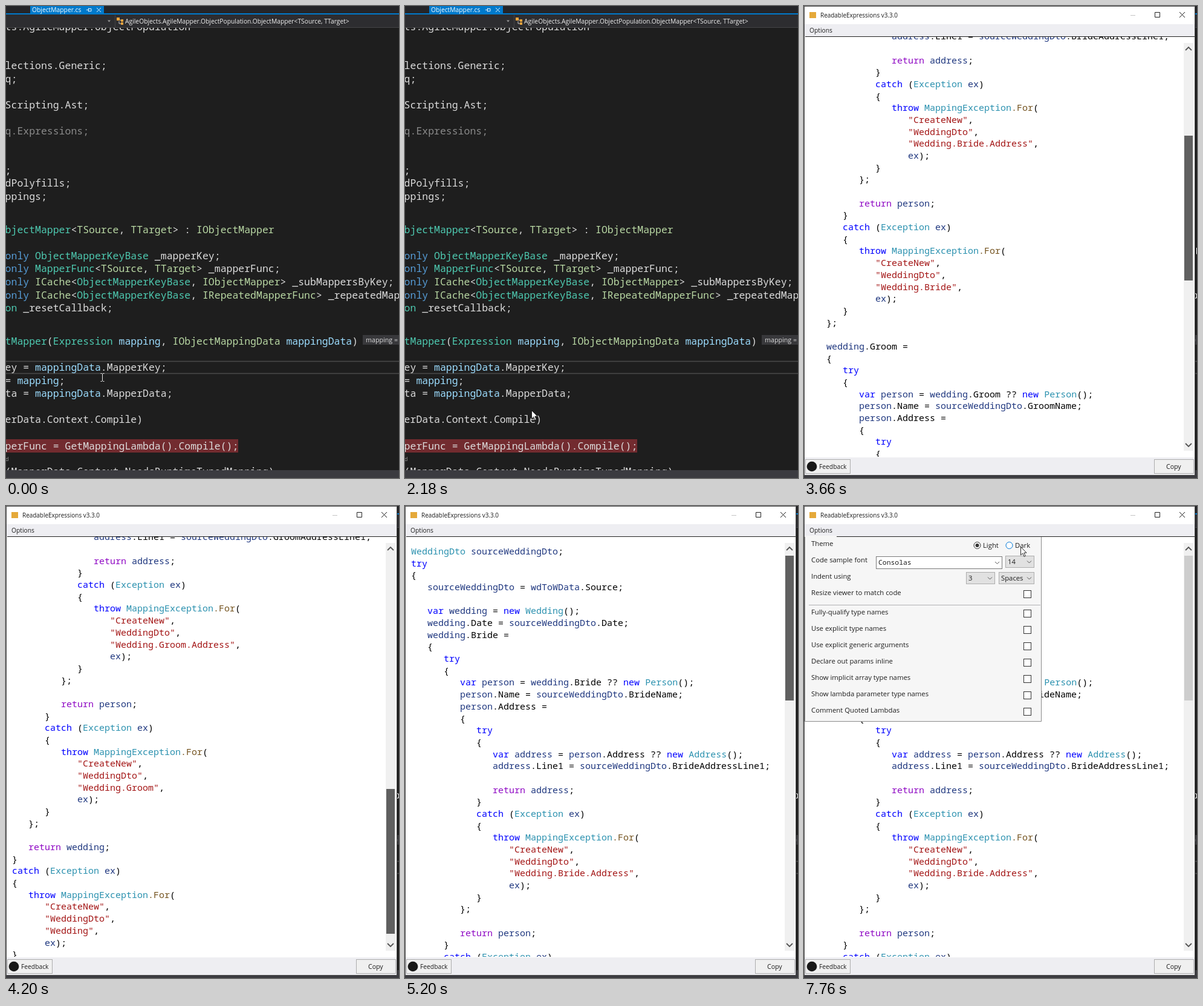
An HTML page that plays this animation: 650x779 px, repeating every 8 s.

```html
<!DOCTYPE html>
<html lang="en">
<head>
<meta charset="utf-8">
<title>Expression viewer</title>
<style>
  html, body { margin: 0; width: 100%; height: 100%; overflow: hidden; background: #1e1e1e; }
  svg { display: block; }
  text { font: 10.3px "Open Sans", "Noto Sans", sans-serif; white-space: pre; }
  .dark text { font: 16.49px "Noto Sans Mono", monospace; fill: #dcdcdc; }
  .light text { font: 15px "Noto Sans Mono", monospace; fill: #000; }
  .panel text { font-size: 11.3px; fill: #1e1e1e; }
  .panel .mono { font: 11.4px "Noto Sans Mono", monospace; }
  .dark .kw { fill: #569cd6; }
  .dark .type { fill: #4ec9b0; }
  .dark .iface { fill: #b8d7a3; }
  .dark .param { fill: #9cdcfe; }
  .dark .dim { fill: #8a8a8a; }
  .light .kw { fill: #0000ff; }
  .light .ret { fill: #8f08c4; }
  .light .type { fill: #2b91af; }
  .light .var { fill: #1f377f; }
  .light .fn { fill: #74531f; }
  .light .str { fill: #a31515; }
</style>
</head>
<body>
<svg id="stage" width="650" height="779" viewBox="0 0 650 779"></svg>
<script>
const stage = document.getElementById('stage');
const $ = id => document.getElementById(id);

// Markup helpers
const esc = s => s.replace(/&/g, '&amp;').replace(/</g, '&lt;');
const rect = (x, y, w, h, fill, more = '') =>
  `<rect x="${x}" y="${y}" width="${w}" height="${h}" fill="${fill}" ${more}/>`;
const box = (x, y, w, h, fill, stroke) => rect(x + .5, y + .5, w - 1, h - 1, fill, `stroke="${stroke}"`);
const path = (d, stroke = '#555', width = 1) =>
  `<path d="${d}" fill="none" stroke="${stroke}" stroke-width="${width}"/>`;
const label = (x, y, s, fill = '#1e1e1e', more = '') =>
  `<text x="${x}" y="${y}" fill="${fill}" ${more}>${esc(s)}</text>`;
const span = (cls, s) => cls ? `<tspan class="${cls}">${esc(s)}</tspan>` : esc(s);

// Editor behind the viewer
const editorLines = [
  [34, 'ts.AgileMapper.ObjectPopulation'],
  [98, 'lections.Generic;'],
  [120, 'q;'],
  [163, 'Scripting.Ast;'],
  [206, 'q.Expressions;'],
  [271, ';'],
  [292, 'dPolyfills;'],
  [314, 'ppings;'],
  [369, 'bjectMapper<TSource, TTarget> : IObjectMapper'],
  [412, 'only ObjectMapperKeyBase _mapperKey;'],
  [433, 'only MapperFunc<TSource, TTarget> _mapperFunc;'],
  [455, 'only ICache<ObjectMapperKeyBase, IObjectMapper> _subMappersByKey;'],
  [477, 'only ICache<ObjectMapperKeyBase, IRepeatedMapperFunc> _repeatedMappers;'],
  [498, 'on _resetCallback;'],
  [553, 'tMapper(Expression mapping, IObjectMappingData mappingData)'],
  [596, 'ey = mappingData.MapperKey;'],
  [618, '= mapping;'],
  [639, 'ta = mappingData.MapperData;'],
  [682, 'erData.Context.Compile)'],
  [726, 'perFunc = GetMappingLambda().Compile();'],
  [768, '(MapperData.Context.NeedsRuntimeTypedMapping)']
];

function editorToken(w) {
  if (w === 'only') return 'kw';
  if (/^(I[A-Z]\w+|TSource|TTarget)$/.test(w)) return 'iface';
  if (/^(bjectMapper|tMapper|ObjectMapperKeyBase|MapperFunc|Expression|on)$/.test(w)) return 'type';
  if (/^mapping(Data)?$/.test(w)) return 'param';
}

const editorText = ([y, s]) => {
  const body = s === 'q.Expressions;' ? span('dim', s)
    : s.match(/\w+|\W+/g).map(w => span(editorToken(w), w)).join('');
  return `<text x="-1.4" y="${y + 5.5}">${body}</text>`;
};

const editor = `
  ${rect(0, 0, 650, 779, '#1e1e1e')}
  <svg y="36" width="650" height="730" viewBox="0 36 650 730">
    ${rect(0, 715, 384, 22, '#722b2f')}
    ${path('M0 586.5H650M0 606.5H650', '#4a4a4a', 1.5)}
    <g class="dark">${editorLines.map(editorText).join('')}</g>
    ${label(-1, 751, 'd', '#999', 'style="font-size:9px"')}
    ${rect(590, 543, 60, 16, '#38383b')}
    ${label(595, 555, 'mapping =', '#dcdcdc', 'style="font-size:10.7px"')}
  </svg>
  ${rect(0, 766, 650, 13, '#3b3b40')}
  ${rect(0, 0, 650, 36, '#2d2d30')}
  ${rect(0, 0, 650, 13, '#252528')}
  ${rect(40, 0, 122, 14, '#007acc')}
  ${rect(0, 12, 650, 2, '#007acc')}
  ${label(43, 10, 'ObjectMapper.cs', '#fff')}
  ${path('M133 6.5h3M136.5 3.5v6M137 4.5h4v4h-4M150 3l7 7M157 3l-7 7', '#e6f2fa')}
  ${path('M0 35.5H650M180.5 15V35', '#434346')}
  <path d="M168 23.500h5l-2.500 3z" fill="#999"/>
  ${path('M187 22l3 2M187 25v4h4', '#c8c8c8')}
  ${rect(183, 19, 5, 5, '#e8a33d')}${rect(190, 22, 4, 4, '#e8a33d')}${rect(190, 27, 4, 4, '#e8a33d')}
  ${label(197, 29, 'AgileObjects.AgileMapper.ObjectPopulation.ObjectMapper<TSource, TTarget>', '#f1f1f1')}`;

const tip = `<g id="tip">
  ${box(62, 627, 285, 21, '#424245', '#5a5a5e')}
  <g id="tipHover">${rect(64, 629, 276, 17, '#54545a')}</g>
  <path d="M69 633.500l5 4-5 4z" fill="#c8c8c8"/>
  ${box(80, 633, 9, 9, '#75bfff', '#424245')}
  ${label(94, 641.5, 'mapping', '#f1f1f1')}
  <circle cx="166" cy="636" r="3.500" fill="none" stroke="#e0e0e0"/>
  ${path('M168.500 638.500l4 4', '#e0e0e0', 1.5)}
  <path d="M175 636h5l-2.500 3z" fill="#c8c8c8"/>
  ${label(186, 641.5, '{wdToWData => { var wedding }}', '#f1f1f1')}
</g>`;

// Code shown in the viewer
const indent = lines => lines.map(l => l && '   ' + l);
const guarded = (body, name) => [
  'try', '{', ...indent(body), '}',
  'catch (Exception ex)', '{',
  ...indent(['throw MappingException.For(', ...indent(['"CreateNew",', '"WeddingDto",', `"${name}",`, 'ex);'])]),
  '}'
];
const partner = p => [
  `wedding.${p} =`, '{',
  ...indent(guarded([
    `var person = wedding.${p} ?? new Person();`,
    `person.Name = sourceWeddingDto.${p}Name;`,
    'person.Address =', '{',
    ...indent(guarded([
      'var address = person.Address ?? new Address();',
      `address.Line1 = sourceWeddingDto.${p}AddressLine1;`,
      '', 'return address;'
    ], `Wedding.${p}.Address`)),
    '};', '', 'return person;'
  ], `Wedding.${p}`)),
  '};', ''
];
const viewerLines = ['WeddingDto sourceWeddingDto;', ...guarded([
  'sourceWeddingDto = wdToWData.Source;', '',
  'var wedding = new Wedding();',
  'wedding.Date = sourceWeddingDto.Date;',
  ...partner('Bride'), ...partner('Groom'),
  'return wedding;'
], 'Wedding')];

function viewerToken(w) {
  if (w[0] === '"') return 'str';
  if (w === '.For') return 'fn';
  if (w === 'return') return 'ret';
  if (/^(var|new|try|catch|throw)$/.test(w)) return 'kw';
  if (/^[A-Z]/.test(w)) return 'type';
  if (/^[a-z]/.test(w)) return 'var';
}

const viewerText = (s, i) => {
  const code = s.trimStart();
  if (!code) return '';
  const body = code.match(/"[^"]*"|\.?\w+|[^\w".]+/g).map(w => span(viewerToken(w), w)).join('');
  return `<text x="${10 + 9 * (s.length - code.length)}" y="${(80 + i * 19.68).toFixed(2)}">${body}</text>`;
};

const viewer = `
  ${box(0, 0, 647, 775, '#fff', '#4a4a4a')}
  ${rect(9, 10, 11, 10, '#e5a93a')}
  <g id="caption">${label(27, 19, 'ReadableExpressions v3.3.0', 'currentColor', 'style="font-size:9.95px"')}
    ${path('M621 10l9 9M630 10l-9 9', 'currentColor')}</g>
  ${path('M540 15.500h8', '#c4c4c4')}
  ${path('M580.500 10.500h8v8h-8z', '#222')}
  ${rect(1, 30, 645, 21, '#eeeef2')}
  ${label(9, 44, 'Options')}
  ${path('M2 50.500H646', '#222')}
  <svg y="51" width="646" height="693" viewBox="0 51 646 693">
    <g id="code" class="light">${viewerLines.map(viewerText).join('')}</g>
    ${rect(628, 61, 16, 673, '#f0f0f0')}
    <rect id="thumb" x="629" width="14" height="239"/>
    ${path('M631 73l5-5 5 5M631 722l5 5 5-5', '#555', 1.8)}
  </svg>
  ${rect(1, 745, 645, 29, '#eeeef2')}
  ${box(2, 748, 75, 24, '#f0f0f0', '#adadad')}
  <circle cx="13" cy="760" r="8.300" fill="#181818"/>
  ${label(25, 763.5, 'Feedback')}
  ${box(579, 748, 66, 24, '#f0f0f0', '#adadad')}
  ${label(599, 763.5, 'Copy', '#1e1e1e', 'style="font-size:10.6px"')}`;

// Options panel
const combo = (x, y, w, h, s, fill = '#e1e1e1', stroke = '#adadad', cls = '') =>
  box(x, y, w, h, fill, stroke) +
  label(x + 4, y + h / 2 + 3.8, s, '#1e1e1e', `class="${cls}"`) +
  path(`M${x + w - 12} ${y + h / 2 - 1.5}l3.500 3.500 3.500-3.500`);
const settings = ['Fully-qualify type names', 'Use explicit type names', 'Use explicit generic arguments',
  'Declare out params inline', 'Show implicit array type names', 'Show lambda parameter type names',
  'Comment Quoted Lambdas'];
const check = y => box(363, y, 13, 13, '#fff', '#333');

const panel = `<g id="panel" class="panel">
  ${rect(1, 51, 392, 305, '#f6f6f6')}
  ${path('M1.500 51V355.500H392.500V51', '#8c8c8c')}
  ${rect(2, 49, 52, 3, '#f6f6f6')}
  ${['Theme', 'Code sample font', 'Indent using', 'Resize viewer to match code']
    .map((s, i) => label(12, 66 + i * 27, s)).join('')}
  <circle cx="286.500" cy="65" r="5.500" fill="#fff" stroke="#333"/>
  <circle cx="286.500" cy="65" r="3" fill="#333"/>
  ${label(296, 69, 'Light')}
  <circle id="darkRing" cx="339.500" cy="65" r="5.500" fill="#fff"/>
  ${label(349, 69, 'Dark')}
  ${combo(119, 83, 209, 21, 'Consolas', '#fff', '#7a7a7a', 'mono')}
  ${combo(333, 82, 48, 20, '14')}
  ${combo(268, 109, 48, 20, '3')}
  ${combo(322, 109, 59, 20, 'Spaces')}
  ${check(139)}
  ${path('M8 163.500H391', '#b0b0b4')}
  ${settings.map((s, i) => label(12, 179 + i * 27, s) + check(171 + i * 27)).join('')}
</g>`;

const pointers = `
  <g id="beam">${path('M-3-6.500h2l1 1 1-1h2M0-6V6M-3 6.500h2l1-1 1 1h2', '#e8e8e8')}</g>
  <path id="arrow" d="M.500.500V14l3.200-3 2.300 5.500 2.200-1-2.300-5.300H10z" fill="#fff" stroke="#111" stroke-width=".9"/>`;

stage.innerHTML = editor + tip + `<g id="viewer">${viewer}${panel}</g>` + pointers;

const LOOP = 8000, TICK = 77.6;
const pointerKeys = [
  [0, 159, 613], [3, 58, 608], [8, 58, 608], [9, 58, 617], [12, 58, 617], [18, 161, 634],
  [19, 161, 634], [20, 169, 638], [21, 167, 640], [26, 167, 640], [28, 209, 667], [31, 213, 665],
  [37, 634, 252], [38, 636, 251], [42, 636, 251], [43, 638, 268], [47, 648, 397], [54, 649, 648],
  [57, 648, 699], [58, 648, 699], [59, 670, 705], [71, 670, 240], [72, 577, 200], [82, 26, 40],
  [85, 26, 40], [91, 256, 78], [92, 256, 78], [93, 264, 79], [100, 358, 67]
];
const thumbKeys = [[42, 0], [43, 7], [47, 132], [54, 385], [57, 391], [61, 391], [67, 0]];

function at(keys, n) {
  const i = keys.findIndex(k => k[0] > n);
  if (i < 0) return keys[keys.length - 1].slice(1);
  if (i === 0) return keys[0].slice(1);
  const a = keys[i - 1], b = keys[i], u = (n - a[0]) / (b[0] - a[0]);
  return a.slice(1).map((v, j) => v + (b[j + 1] - v) * u);
}
const show = (id, on) => $(id).style.display = on ? '' : 'none';
const move = (id, x, y) => $(id).setAttribute('transform', `translate(${x} ${y})`);

function draw(now) {
  const n = Math.floor((now % LOOP + 10) / TICK);
  const [x, y] = at(pointerKeys, n).map(Math.round);
  const [drag] = at(thumbKeys, n);
  show('beam', n < 13);
  show('arrow', n >= 13);
  move('beam', x + .5, y);
  move('arrow', x, y);
  show('tip', n >= 7 && n < 25);
  show('tipHover', n >= 15);
  show('viewer', n >= 29);
  show('panel', n >= 86);
  $('caption').style.color = n < 43 ? '#808080' : '#1a1a1a';
  $('thumb').setAttribute('y', 82 + Math.round(drag));
  $('thumb').setAttribute('fill', n >= 43 && n < 70 ? '#606060' : '#cdcdcd');
  move('code', 0, -Math.round(drag * 2.872));
  $('darkRing').setAttribute('stroke', x > 333 ? '#0078d7' : '#333');
  requestAnimationFrame(() => draw(performance.now()));
}
draw(0);
</script>
</body>
</html>
```
